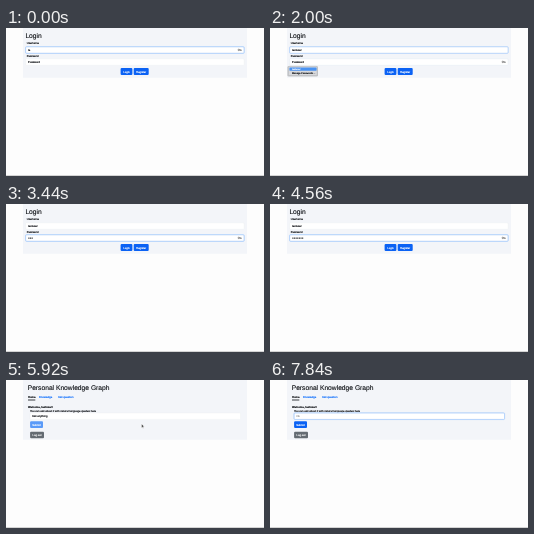
Recreate the animation shown at these times as an HTML page. Size 258 px wide and 148 px high, loop 8 s.

```html
<!DOCTYPE html>
<html lang="en">
<head>
<meta charset="utf-8">
<title>Login</title>
<style>
html, body { margin: 0; width: 100%; height: 100%; overflow: hidden; background: #fdfdfd; }
svg { display: block; width: 258px; height: 148px; }
text { font: 2.7px "Liberation Sans", Arial, sans-serif; fill: #0c0f13; stroke: #0c0f13; stroke-width: .14; text-rendering: geometricPrecision; }
.title { font-size: 6.7px; stroke-width: .12; }
.bold { font-weight: bold; }
.link { fill: #0d6efd; stroke: #0d6efd; }
.mid { text-anchor: middle; }
.white { fill: #fff; stroke: #fff; }
.small { font-size: 2.4px; }
.faint { fill: #555; stroke: none; }
.panel { fill: #f3f5f9; }
.field { fill: #fff; stroke: #dee2e6; stroke-width: .2; }
.glow rect { fill: none; stroke: #86b7fe; stroke-width: .35; }
.glow rect:first-child { stroke: #c9dffa; stroke-width: .9; }
.button { fill: #0b62f4; }
</style>
</head>
<body>
<svg viewBox="0 0 258 148">
  <rect y="147" width="258" height="1" fill="#d4d4d4"/>

  <g id="login">
    <rect class="panel" x="17" width="224" height="49.7"/>
    <text class="title" x="19.4" y="10.4">Login</text>
    <text x="20.7" y="16.2">Username</text>
    <text x="20.7" y="29">Password</text>
    <rect class="field" x="19.7" y="18.8" width="218.4" height="6.5" rx="1"/>
    <rect class="field" x="19.7" y="30.8" width="218.4" height="6.5" rx="1"/>
    <g class="glow" id="userGlow">
      <rect x="19.5" y="18.6" width="218.8" height="6.8" rx="1"/>
      <rect x="19.7" y="18.8" width="218.4" height="6.5" rx="1"/>
    </g>
    <g class="glow" id="passGlow">
      <rect x="19.5" y="30.6" width="218.8" height="6.8" rx="1"/>
      <rect x="19.7" y="30.8" width="218.4" height="6.5" rx="1"/>
    </g>
    <text id="user" x="22.1" y="23"></text>
    <text id="passHint" x="22.1" y="35">Password</text>
    <g id="dots"></g>
    <g id="key" fill="none" stroke="#333" stroke-width=".5">
      <circle cx="232.8" cy="0" r=".75"/>
      <path d="M233.5 0h1.8v.9m-.8-.9v.7"/>
    </g>
    <rect class="button" x="114.6" y="40.1" width="11.8" height="6.9" rx="1"/>
    <rect class="button" id="register" x="127.7" y="40.1" width="15" height="6.9" rx="1"/>
    <text class="mid white" x="120.5" y="44.5">Login</text>
    <text class="mid white" x="135.2" y="44.5">Register</text>
    <g id="menu">
      <rect x="17.4" y="38" width="30.6" height="10.6" rx="1.4" fill="#000" opacity=".2"/>
      <rect x="18.4" y="38.3" width="28.7" height="9.2" rx="1" fill="#d8d9dc" stroke="#a5a6a9" stroke-width=".3"/>
      <rect x="19.4" y="39.4" width="27.2" height="3.3" rx=".6" fill="#4a93f2"/>
      <text class="white small" x="22" y="42">testuser</text>
      <text class="small" x="22" y="45.9">Manage Passwords…</text>
    </g>
  </g>

  <g id="home">
    <rect class="panel" x="17" width="224" height="59.7"/>
    <text class="title" x="21.7" y="10.4">Personal Knowledge Graph</text>
    <text class="bold" x="22" y="17.9">Home</text>
    <rect x="22" y="19.6" width="7.3" height=".8" fill="#0c0f13"/>
    <text class="link" x="33" y="17.9">Knowledge</text>
    <text class="link" x="52" y="17.9">Ask question</text>
    <text class="bold" x="22" y="28">Welcome, testuser!</text>
    <text x="24" y="31.9">You can ask about it with natural language queries here</text>
    <rect class="field" x="24.1" y="33" width="210.4" height="6.4" rx="1"/>
    <g class="glow" id="askGlow">
      <rect x="23.9" y="32.8" width="210.8" height="6.8" rx="1"/>
      <rect x="24.1" y="33" width="210.4" height="6.4" rx="1"/>
    </g>
    <text id="askHint" x="26" y="37.2">Ask anything</text>
    <text id="ask" class="faint" x="25.8" y="37.2"></text>
    <rect class="button" id="submit" x="24.1" y="41.2" width="12.9" height="6.8" rx="1"/>
    <text class="mid white" x="30.5" y="45.5">Submit</text>
    <rect x="24.1" y="51.7" width="13.9" height="6.6" rx="1" fill="#646b72"/>
    <text class="mid white" x="31" y="55.9">Log out</text>
  </g>

  <g id="pointer">
    <path id="arrow" d="M0 0v3.7l.9-.8.6 1.4.7-.3-.6-1.3h1.2z" fill="#222" stroke="#fff" stroke-width=".5"/>
    <path id="beam" d="M0-1.5v3" stroke="#444" stroke-width=".4"/>
  </g>
</svg>
<script>
const el = Object.fromEntries([...document.querySelectorAll('[id]')].map(e => [e.id, e]));
const LOOP = 8000, NAV = 5840;

// Moments at which each successive character appears
const userKeys = [0, 0, 320, 400, 960, 1040, 1280, 1440];
const passKeys = [3120, 3280, 3440, 3680, 4160, 4320, 4560, 4720];
const askKeys = [7280, 7360, 7520, 7680, 7840];
// Pointer path: time, x, y
const path = [[4880, 38, 34], [5280, 139, 46], [5520, 135.5, 44], [6000, 135.5, 44], [6480, 39, 36.2]];

el.dots.innerHTML = passKeys.map((_, i) =>
  `<circle cx="${22.9 + i * 1.63}" cy="34.1" r=".7" fill="#0c0f13"/>`).join('');

const ramp = (t, a, b) => Math.min(1, Math.max(0, (t - a) / (b - a)));
const ease = p => p * p * (3 - 2 * p);
const typed = (keys, t) => keys.filter(k => k <= t).length;
const show = (e, on) => e.setAttribute('display', on ? 'inline' : 'none');
const mix = (a, b, p) => `rgb(${a.map((v, i) => Math.round(v + (b[i] - v) * p))})`;

function pointerAt(t) {
  let [, x, y] = path[0];
  for (let i = 1; i < path.length; i++) {
    const p = ease(ramp(t, path[i - 1][0], path[i][0]));
    x += (path[i][1] - path[i - 1][1]) * p;
    y += (path[i][2] - path[i - 1][2]) * p;
  }
  return [x, y];
}

function draw(t) {
  show(el.login, t < NAV);
  show(el.home, t >= NAV);

  const passFocus = t >= 2000;
  el.user.textContent = 'testuser'.slice(0, typed(userKeys, t));
  el.userGlow.style.opacity = 1 - ramp(t, 1980, 2150);
  el.passGlow.style.opacity = ramp(t, 1990, 2160);
  el.key.setAttribute('transform', `translate(0 ${passFocus ? 33.9 : 21.9})`);
  show(el.menu, passFocus && t < 3120);

  const dots = typed(passKeys, t);
  show(el.passHint, !dots);
  [...el.dots.children].forEach((dot, i) => show(dot, i < dots));

  const [x, y] = pointerAt(t);
  const hover = t > 4880 && x > 127.7 && y > 40;
  el.register.style.fill = t >= 5680 ? '#0a51c4' : hover ? '#0b5ed7' : '';

  el.askGlow.style.opacity = ramp(t, 6520, 6800);
  const chars = typed(askKeys, t);
  el.ask.textContent = 'I lik'.slice(0, chars);
  show(el.askHint, !chars);
  el.submit.style.fill = mix([90, 154, 248], [11, 98, 244], ramp(t, 7240, 7360));

  const overField = t >= NAV && y < 39.4;
  show(el.pointer, t >= 4880 && t < 7280);
  show(el.arrow, !overField);
  show(el.beam, overField);
  el.pointer.setAttribute('transform', `translate(${x} ${y})`);
}

function frame() {
  draw(performance.now() % LOOP);
  requestAnimationFrame(frame);
}
frame();
</script>
</body>
</html>
```
